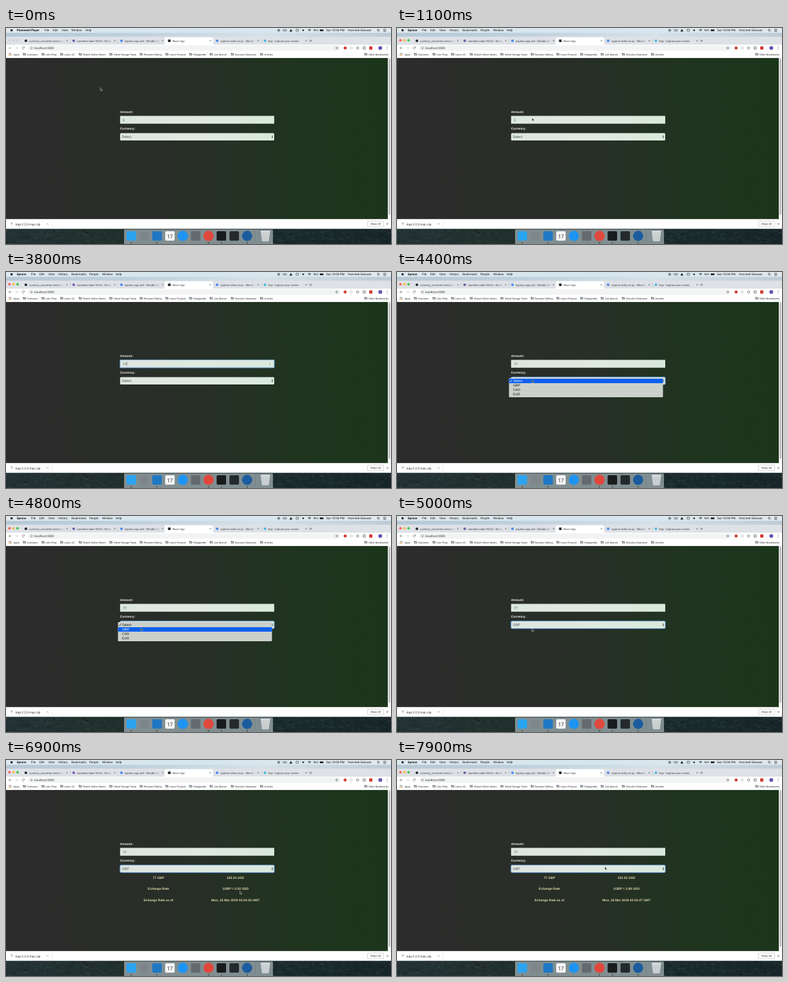
Recreate the animation shown at these times as an HTML page with a canvas. Size 600x338 px, loop 8 s.

```html
<!DOCTYPE html>
<html lang="en">
<head>
<meta charset="utf-8">
<title>Currency converter</title>
<style>
html, body { margin: 0; width: 100%; height: 100%; overflow: hidden; background: #fff; }
canvas { display: block; width: 600px; height: 338px; }
</style>
</head>
<body>
<canvas id="stage"></canvas>
<script>
const W = 600, H = 338, LOOP = 8000, STEP = 100;
const UI = 'Roboto, "Open Sans", sans-serif';
const PAGE = '"Liberation Sans", Arial, sans-serif';
const dpr = window.devicePixelRatio || 1;
const stage = document.getElementById('stage');
stage.width = W * dpr;
stage.height = H * dpr;
let c;

// When each thing happens, in ms
const T = { front: 1000, beam: 1200, focus: 1400, mark: 1700, seven: 2700, pair: 2900,
  show: 4000, open: 4400, pick: 5000, first: 5100, second: 7100 };

// Pointer stops: time, x, y
const PATH = [[0, 147, 93.4], [200, 147, 93.4], [1000, 210, 139.6], [1200, 211, 142], [4000, 211, 142],
  [4300, 210, 168], [4500, 210, 169], [4700, 210, 174.6], [5100, 210, 176], [5700, 349, 191],
  [6400, 350, 192], [7000, 365.5, 206], [7200, 365.5, 206], [7800, 324, 167], [8000, 324, 167]];

function box(x, y, w, h, fill, r = 0) {
  c.fillStyle = fill;
  c.beginPath();
  c.roundRect(x, y, w, h, r);
  c.fill();
}
function frame(x, y, w, h, color, r, lw) {
  c.strokeStyle = color;
  c.lineWidth = lw;
  c.beginPath();
  c.roundRect(x, y, w, h, r);
  c.stroke();
}
function dot(x, y, r, fill) {
  c.fillStyle = fill;
  c.beginPath();
  c.arc(x, y, r, 0, 7);
  c.fill();
}
function ring(x, y, r, color, w = 0.5, a = 0, b = 7) {
  c.strokeStyle = color;
  c.lineWidth = w;
  c.beginPath();
  c.arc(x, y, r, a, b);
  c.stroke();
}
function trace(pts) {
  c.beginPath();
  for (let i = 0; i < pts.length; i += 2) c.lineTo(pts[i], pts[i + 1]);
}
function line(pts, color, w = 0.6) {
  trace(pts);
  c.strokeStyle = color;
  c.lineWidth = w;
  c.stroke();
}
function poly(pts, fill) {
  trace(pts);
  c.closePath();
  c.fillStyle = fill;
  c.fill();
}
function text(s, x, y, size, color, font = UI, weight = 400, align = 'left') {
  c.font = `${weight} ${size}px ${font}`;
  c.textAlign = align;
  c.fillStyle = color;
  c.fillText(s, x, y);
}
function cross(x, y, r, color) {
  line([x - r, y - r, x + r, y + r], color);
  line([x - r, y + r, x + r, y - r], color);
}
function blend(x0, y0, x1, y1, ...colors) {
  const g = c.createLinearGradient(x0, y0, x1, y1);
  colors.forEach((k, i) => g.addColorStop(i / (colors.length - 1), k));
  return g;
}

function menuBar(front) {
  box(0, 0, W, 7.5, blend(0, 0, W, 0, '#dfe8ed', '#d5e5ef', '#e1e9ee'));
  dot(8.7, 3.6, 1.8, '#222');
  text(front ? 'Sprune' : 'Plumereel Player', 16.7, 3.9, 4.6, '#111', UI, 700);
  const items = front
    ? [['File', 39], ['Edit', 52], ['View', 66], ['History', 81.5], ['Bookmarks', 102],
       ['People', 130], ['Window', 150], ['Help', 171]]
    : [['File', 60], ['Edit', 73], ['View', 87], ['Window', 102], ['Help', 124]];
  for (const [s, x] of items) text(s, x, 3.9, 4.6, '#111');
  ring(425, 3.6, 1.8, '#222');
  dot(425, 3.6, 0.9, '#222');
  ring(433, 3.6, 1.4, '#222');
  ring(436, 3.6, 1.4, '#222');
  poly([444, 1.6, 446.4, 5.4, 441.6, 5.4], '#222');
  line([452, 2, 456, 2, 456, 5, 452, 5, 452, 2], '#333');
  dot(463, 3.6, 1.4, '#333');
  for (const r of [1.2, 2.4, 3.5]) ring(473, 5.6, r, '#222', 0.7, -2.3, -0.85);
  text('98%', 479, 3.9, 4.2, '#111');
  box(489, 2.3, 5.6, 2.8, '#222', 0.5);
  text('Sun 10:54 PM', 499, 3.9, 4.6, '#111');
  text('Harvinek Soluwan', 533, 3.9, 4.6, '#111');
  ring(580, 3.2, 1.4, '#222', 0.6);
  line([581, 4.2, 582.4, 5.6], '#222');
  for (const y of [2, 3.7, 5.4]) line([588, y, 592.5, y], '#222');
}

function tabs() {
  box(0, 7, W, 7, blend(0, 0, W, 0, '#b6c8d5', '#bfd1de', '#d6e1e8', '#bccbd6'));
  box(0, 13.4, W, 13.1, '#dee1e6', [2, 2, 0, 0]);
  box(247.3, 14.5, 75.4, 12, '#fff', [2.5, 2.5, 0, 0]);
  const list = [['currency_convertor/server.js at', '#24292e'], ['nameless-lake-76516 - Nimbra', '#6f5aa8'],
    ['express app exit - Wendlo Sea', '#4c8bf0'], ['React App', '#22282c'],
    ['capture video on pc - Wendlo S', '#4c8bf0'], ['Kap - Capture your screen', '#4bb9e0']];
  list.forEach(([s, color], i) => {
    const x = 31 + i * 74.5;
    if (i === 3) box(x - 2, 18, 4, 4, color);
    else dot(x, 20, 2.1, color);
    c.save();
    c.beginPath();
    c.rect(x + 4, 14, 57, 12);
    c.clip();
    text(s, x + 5, 20.3, 4.2, blend(x + 50, 0, x + 61, 0, '#3c4043', i === 3 ? '#fff' : '#dee1e6'));
    c.restore();
    cross(x + 64, 20, 1.1, '#5f6368');
    if (i !== 2 && i !== 3) line([x + 69, 17, x + 69, 23], '#a5a9ae', 0.4);
  });
  line([473, 20, 477, 20], '#5f6368');
  line([475, 18, 475, 22], '#5f6368');
}

// Window buttons and the back arrow are grey until the window is in front
function windowState(front) {
  const colors = front ? ['#fc5b57', '#fdbc40', '#34c84a'] : ['#cdd0d4', '#cdd0d4', '#cdd0d4'];
  colors.forEach((k, i) => dot(5.4 + i * 6.3, 19.2, 1.9, k));
  const ink = front ? '#555' : '#999';
  line([8.5, 31.3, 4.5, 31.3], ink);
  line([6.4, 29.4, 4.5, 31.3, 6.4, 33.2], ink);
}

function toolbar() {
  box(0, 26, W, 21, '#fff');
  line([14.5, 31.3, 18.5, 31.3], '#bbb');
  line([16.6, 29.4, 18.5, 31.3, 16.6, 33.2], '#bbb');
  ring(27, 31.3, 1.8, '#555', 0.6, 0.5, 5.6);
  poly([27.4, 30.7, 29.2, 30.7, 29.2, 28.9], '#555');
  box(34.5, 27.2, 486.5, 8.2, '#f1f3f4', 4.1);
  ring(39.7, 31.3, 1.6, '#5f6368');
  line([39.7, 31, 39.7, 32.3], '#5f6368', 0.5);
  text('localhost:3000', 44, 31.6, 4.7, '#333');
  const star = [];
  for (let i = 0; i < 11; i++) {
    const r = i % 2 ? 0.9 : 2.1, a = i * Math.PI / 5 - Math.PI / 2;
    star.push(515.5 + r * Math.cos(a), 31.4 + r * Math.sin(a));
  }
  line(star, '#555', 0.5);
  dot(528.5, 31.3, 2.4, '#d3382f');
  ring(538, 31.3, 1.9, '#999');
  ring(548, 31.3, 1.7, '#666', 0.8);
  frame(556.4, 29.6, 3.6, 3.4, '#444', 0.8, 0.8);
  box(566, 28.8, 5, 5, '#d63a32', 0.6);
  line([576, 28.5, 576, 34], '#ddd', 0.5);
  dot(583.3, 31.3, 3, '#6a55b5');
  for (const y of [29.4, 31.3, 33.2]) dot(594, y, 0.5, '#555');

  const dots = ['#e8473c', '#4285f4', '#35a553', '#f6b90c'];
  for (let i = 0; i < 9; i++) box(4.3 + i % 3 * 1.5, 39.2 + Math.floor(i / 3) * 1.5, 1.1, 1.1, dots[i % 4]);
  text('Apps', 11.7, 41.4, 4, '#333');
  const marks = [['Cartoons', 33], ['Lets Prep', 62], ['Learn JS', 91], ['Watch Online Series', 120],
    ['Velvet Garage Team', 167.7], ['Resume Editing', 215], ['Learn Finance', 255], ['Dealgarden', 292],
    ['Job Search', 324], ['Security Clearance', 357], ['Articles', 402.5], ['Other Bookmarks', 565]];
  for (const [s, x] of marks) {
    box(x - 6.4, 39.2, 2, 1.4, '#5f6368', 0.3);
    box(x - 6.4, 39.7, 4.6, 3.3, '#5f6368', 0.4);
    box(x - 5.8, 40.7, 3.4, 1.7, '#d5d7d9');
    text(s, x, 41.4, 4, '#333');
  }
  line([0, 46.8, W, 46.8], '#d5d7da', 0.4);
}

function downloads() {
  box(0, 299, W, 15.2, '#fff');
  line([0, 299.2, W, 299.2], '#ccc', 0.4);
  box(7.2, 304, 3.8, 5, '#eee', 0.3);
  box(8.5, 304, 1, 3, '#888');
  text('kap-2.2.0-mac.zip', 15, 307.2, 4.9, '#333');
  line([63.3, 307.4, 64.8, 305.9, 66.3, 307.4], '#555');
  line([72, 301, 72, 312], '#d8d8d8', 0.5);
  frame(563.5, 302, 25, 9, '#aaa', 1.4, 0.5);
  text('Show All', 576, 306.8, 4.2, '#333', UI, 400, 'center');
  cross(594.3, 306.5, 1.4, '#444');
}

function desktop() {
  box(0, 314, W, 24, blend(0, 314, W, 338, '#243236', '#22302d', '#1f2d2a', '#1b2b2d', '#182629'));
  let seed = 7;
  const rnd = () => (seed = seed * 16807 % 2147483647) / 2147483647;
  for (let i = 0; i < 420; i++) {
    const x = rnd() * W, y = 315 + rnd() * 22;
    line([x, y, x + 2 + rnd() * 5, y - 1 + rnd() * 4], i % 2 ? 'rgba(84,104,98,.3)' : 'rgba(6,14,16,.4)', 0.9);
  }
}

function dock() {
  box(184, 315.2, 232, 24, 'rgba(151,164,168,.82)', [1.5, 1.5, 0, 0]);
  const icons = ['#2ba4f0', '#7e868c', '#1f78c4', '#f5f5f5', '#1d94f3', '#656a6e', '#e0483c', '#191b1d', '#24292b', '#1c5c9e'];
  const round = [1, 4, 6, 9], running = [0, 2, 6, 7, 9];
  icons.forEach((k, i) => {
    const x = 195.3 + i * 20.05;
    if (round.includes(i)) dot(x, 325.3, 8, k);
    else box(x - 7.4, 318, 14.8, 14.8, k, 1.8);
    if (i === 3) text('17', x, 327, 8, '#333', UI, 400, 'center');
    if (running.includes(i)) dot(x, 336.3, 0.8, '#111');
  });
  line([388.5, 318, 388.5, 334], '#6d777a', 0.5);
  poly([397, 318, 411.5, 318, 409.5, 333.5, 399, 333.5], '#d3d8d9');
  for (let i = 0; i < 5; i++) line([399.5 + i * 2.3, 320, 400.6 + i * 1.8, 332], '#aab1b3', 0.5);
  line([397, 318, 411.5, 318], '#f7f8f8', 1);
}

function page() {
  box(0, 47, 595, 252, blend(0, 190, 595, 165, '#2c2c2c', '#2a2d29', '#272f26', '#20341f', '#1b351b'));
  box(595, 47, 5, 252, '#f8f8f8');
  box(596, 47.6, 3, 245, '#c1c1c1', 1.5);
  text('Amount:', 177.8, 131.4, 4.95, '#f0f2ef', PAGE, 700);
  text('Currency:', 177.8, 158, 4.95, '#f0f2ef', PAGE, 700);
}

function field(y, h, r, focused) {
  if (focused) box(177.1, y - 0.7, 241.8, h + 1.4, 'rgba(50,115,205,.6)', r + 0.7);
  box(177.8, y, 240.2, h, blend(178, 0, 418, 0, '#dde6df', '#dfe9e0', '#d9e9db'), r);
  if (focused) frame(177.8, y, 240.2, h, '#6c9fd8', r, 0.6);
}

function arrows(x, y, s, color) {
  poly([x - s, y - 0.5, x, y - 0.5 - s * 1.5, x + s, y - 0.5], color);
  poly([x - s, y + 0.5, x, y + 0.5 + s * 1.5, x + s, y + 0.5], color);
}

function form(t) {
  const typing = t >= T.focus && t < T.open;
  const marked = t >= T.mark && t < T.seven;
  const value = t < T.seven ? '0' : t < T.pair ? '7' : '77';
  field(137.6, 12.2, 0.5, typing);
  if (marked) box(181.8, 140.9, 3.2, 6, '#8fb7e8');
  text(value, 182, 144.3, 5.4, '#495057', PAGE);
  if (t >= T.beam && t < T.show + 100) arrows(411.5, 143.8, 0.9, '#8b948d');
  if (typing && !marked && Math.floor((t - 2800) / 500) % 2 === 0)
    line([182.3 + value.length * 3, 141, 182.3 + value.length * 3, 146.8], '#333', 0.5);

  field(164.4, 11.6, 1.6, t >= T.open);
  text(t < T.pick ? 'Select' : 'GBP', 180.6, 170.5, 5.3, '#495057', PAGE);
  arrows(415, 170.2, 1.2, '#333');
}

function list(t) {
  if (t < T.open || t >= T.pick) return;
  const hover = t < 4600 ? 0 : 1;
  box(174.5, 166, 240, 30, '#cbd0cb', 1);
  box(174.5, 167 + hover * 6.9, 240, 7, '#0b60ee');
  ['Select', 'GBP', 'CAD', 'EUR'].forEach((s, i) =>
    text(s, 181, 170.5 + i * 6.9, 5.2, i === hover ? '#fff' : '#161816', PAGE));
  line([176.2, 170.5, 177.3, 171.9, 179.4, 168.4], hover ? '#161816' : '#fff', 0.7);
}

function results(t) {
  if (t < T.first) return;
  const [rate, sec] = t < T.second ? [2.02, 25] : [2.89, 27];
  const rows = [['77 GBP', (77 * rate).toFixed(2) + ' USD'], ['Echange Rate', `1GBP = ${rate} USD`],
    ['Echange Rate as of', `Mon, 18 Mar 2019 02:54:${sec} GMT`]];
  rows.forEach((row, i) => row.forEach((s, j) =>
    text(s, 237.6 + j * 120, 184.5 + i * 17.4, 5, '#dfd9ae', PAGE, 700, 'center')));
}

function pointer(t) {
  if (t >= T.seven && t < T.show) return;
  const i = Math.max(1, PATH.findIndex(p => p[0] > t));
  const [t0, x0, y0] = PATH[i - 1], [t1, x1, y1] = PATH[i];
  let k = (t - t0) / (t1 - t0);
  k = k * k * (3 - 2 * k);
  const x = x0 + (x1 - x0) * k, y = y0 + (y1 - y0) * k;
  if (t >= T.beam && y > 138 && y < 150) {
    line([x, y - 2.6, x, y + 2.6], '#333', 0.6);
    for (const d of [-2.7, 2.7]) line([x - 1, y + d, x + 1, y + d], '#333', 0.5);
    return;
  }
  const shape = [0, 0, 0, 4.6, 1.1, 3.7, 1.9, 5.4, 2.7, 5, 2, 3.4, 3.4, 3.4];
  poly(shape.map((v, n) => v + (n % 2 ? y : x)), '#0a0a0a');
  c.lineJoin = 'round';
  c.lineWidth = 0.5;
  c.strokeStyle = '#eee';
  c.stroke();
}

function surface() {
  const layer = document.createElement('canvas');
  layer.width = stage.width;
  layer.height = stage.height;
  return layer;
}
function use(canvas) {
  c = canvas.getContext('2d');
  c.setTransform(dpr, 0, 0, dpr, 0, 0);
  c.textBaseline = 'middle';
  c.textRendering = 'geometricPrecision';
}

// Everything that never changes is drawn once
const still = surface();
use(still);
desktop();
dock();
tabs();
toolbar();
page();
downloads();
use(stage);

function draw(t) {
  c.drawImage(still, 0, 0, W, H);
  menuBar(t >= T.front);
  windowState(t >= T.front);
  form(t);
  results(t);
  list(t);
  pointer(t);
}

const start = performance.now();
function tick() {
  const t = (performance.now() - start) % LOOP;
  draw(Math.floor(t / STEP) * STEP);
  requestAnimationFrame(tick);
}
tick();
</script>
</body>
</html>
```
